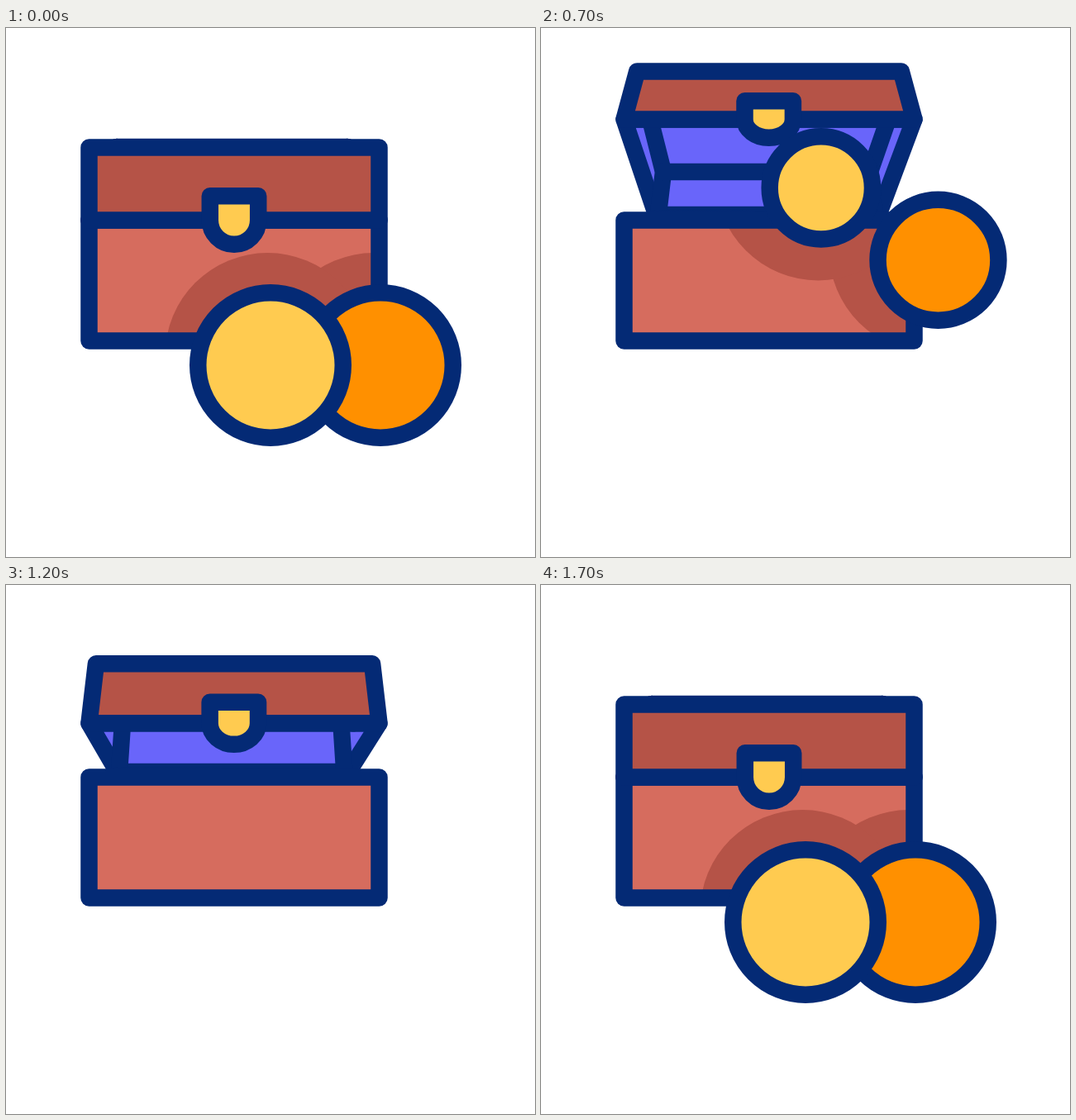
An HTML page with a canvas for the animation above (2 s loop, 640 px wide and 640 px high).

```html
<!DOCTYPE html>
<html lang="en">
<head>
<meta charset="utf-8">
<title>Treasure chest</title>
<style>
html, body { margin: 0; width: 100%; height: 100%; overflow: hidden; background: #fff; }
canvas { display: block; }
</style>
</head>
<body>
<canvas id="stage" width="640" height="640"></canvas>
<script>
const ctx = document.getElementById('stage').getContext('2d');
const LOOP = 2000;
const NAVY = '#042a75', DARK = '#b55347', RED = '#d66c5e';
const GOLD = '#ffcb50', ORANGE = '#ff9000', VIOLET = '#6965fa';
const LEFT = 100.5, RIGHT = 451.5, RIM = 232.5, BASE = 378.5;
const BIG = 87.75, SMALL = 54, REST = 408;

// path: time, x, y; flip: the moment the coin passes behind the chest front
const coins = [
  {
    color: ORANGE, x: 453, shade: -8, shrink: 479, flip: 910, land: 1695,
    path: [[470, 453, 408], [540, 456, 394.5], [700, 480.5, 281.5], [820, 453, 182],
           [910, 395, 124], [1020, 331, 211.5], [1110, 295, 320]]
  },
  {
    color: GOLD, x: 320, shade: -3.5, shrink: 317, flip: 850, land: 1582,
    path: [[320, 320, 408], [400, 325, 393], [460, 333.5, 365.5], [700, 339, 194],
           [860, 265, 122], [1020, 189, 236.5], [1100, 165, 320]]
  }
];

const ramp = (t, from, span) => Math.min(1, Math.max(0, (t - from) / span));

// Smooth curve through timed points, at rest at both ends
function follow(path, t) {
  const last = path.length - 1;
  if (t <= path[0][0]) return path[0].slice(1);
  if (t >= path[last][0]) return path[last].slice(1);
  let i = 0;
  while (t > path[i + 1][0]) i++;
  const a = path[i], b = path[i + 1], span = b[0] - a[0], u = (t - a[0]) / span;
  const slope = (k, c) => k === 0 || k === last ? 0
    : (path[k + 1][c] - path[k - 1][c]) / (path[k + 1][0] - path[k - 1][0]);
  return [1, 2].map(c =>
    a[c] + (b[c] - a[c]) * u * u * (3 - 2 * u) +
    span * u * (1 - u) * ((1 - u) * slope(i, c) - u * slope(i + 1, c)));
}

function pose(coin, t) {
  if (t < 1150) {
    const [x, y] = follow(coin.path, t);
    const r = BIG - (BIG - SMALL) * ramp(t, coin.shrink, 506);
    return { ...coin, x, y, r, front: t < coin.flip };
  }
  const left = Math.max(0, coin.land - t);
  return { ...coin, y: REST + 46.5 * Math.pow(left / 75, 1.226), r: BIG, front: true };
}

function paint(fill) {
  if (fill) {
    ctx.fillStyle = fill;
    ctx.fill();
  }
  ctx.stroke();
}

function poly(points, fill, closed = true) {
  ctx.beginPath();
  points.forEach(([x, y]) => ctx.lineTo(x, y));
  if (closed) ctx.closePath();
  paint(fill);
}

function drawCoin({ x, y, r, color }) {
  ctx.beginPath();
  ctx.arc(x, y, r, 0, Math.PI * 2);
  paint(color);
}

function drawInside(p, hinge) {
  const foot = 226, cy = 144 + 30 * p;
  const l = 129.5 + 9.7 * p, r = 421.2 - 12.8 * p;
  const cl = 134 + 14 * p, cr = 413 - 15 * p;
  poly([[LEFT, hinge], [RIGHT, hinge], [r, foot], [l, foot]], VIOLET);
  poly([[132, hinge], [cl, cy], [131.6 + 10.2 * p, foot]], null, false);
  poly([[420, hinge], [cr, cy], [414.9 - 10.5 * p, foot]], null, false);
  poly([[cl, cy], [cr, cy]], null, false);
  poly([[l, 230.3], [r, RIM]], null, false);
}

function drawLid(p, hinge) {
  const top = 144.5 - 92 * p, inset = 15.7 * p;
  poly([[LEFT + inset, top], [RIGHT - inset, top], [RIGHT, hinge], [LEFT, hinge]], DARK);
  const h = 29.3 - 7 * p, w = 29.2, mid = 276 - 0.3 * p;
  ctx.beginPath();
  ctx.moveTo(mid - w, hinge - h);
  ctx.lineTo(mid + w, hinge - h);
  ctx.lineTo(mid + w, hinge);
  ctx.ellipse(mid, hinge, w, h, 0, 0, Math.PI);
  ctx.closePath();
  paint(GOLD);
}

function drawBox(posed) {
  const w = RIGHT - LEFT, h = BASE - RIM;
  ctx.save();
  ctx.beginPath();
  ctx.rect(LEFT, RIM, w, h);
  ctx.fillStyle = RED;
  ctx.fill();
  ctx.clip();
  ctx.fillStyle = DARK;
  for (const c of posed) {
    if (!c.front) continue;
    ctx.beginPath();
    ctx.arc(c.x + c.shade, c.y - 12, 124, 0, Math.PI * 2);
    ctx.fill();
  }
  ctx.restore();
  ctx.strokeRect(LEFT, RIM, w, h);
}

function draw(t) {
  ctx.fillStyle = '#fff';
  ctx.fillRect(0, 0, 640, 640);
  ctx.strokeStyle = NAVY;
  ctx.lineWidth = 20.5;
  ctx.lineJoin = ctx.lineCap = 'round';

  const p = ramp(t, 10, 350) - ramp(t, 1046, 333);
  const hinge = RIM - 122 * p;
  const posed = coins.map(c => pose(c, t));

  drawInside(p, hinge);
  if (p < 0.45) {
    drawBox(posed);
    drawLid(p, hinge);
  } else {
    drawLid(p, hinge);
    posed.filter(c => !c.front).forEach(drawCoin);
    drawBox(posed);
  }
  posed.filter(c => c.front).forEach(drawCoin);
}

const start = performance.now();
function tick() {
  draw((performance.now() - start) % LOOP);
  requestAnimationFrame(tick);
}
tick();
</script>
</body>
</html>
```
